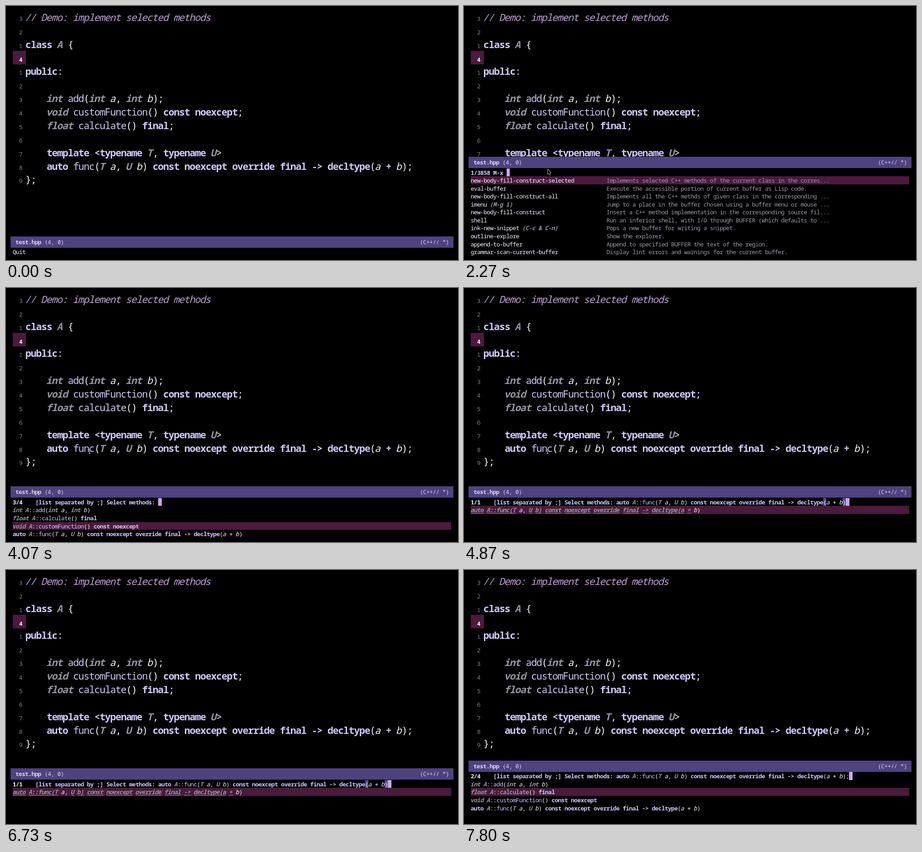
Animation of 998x561 px, one loop 8 s. Source, as an HTML page with a canvas:

```html
<!DOCTYPE html>
<html lang="en">
<head>
<meta charset="utf-8">
<title>Editor demo</title>
<style>
html, body { margin: 0; width: 100%; height: 100%; overflow: hidden; background: #000; }
canvas { display: block; width: 998px; height: 561px; }
</style>
</head>
<body>
<canvas id="stage" width="998" height="561"></canvas>
<script>
const ctx = document.getElementById('stage').getContext('2d');
const LOOP = 8000, TICK = 1000 / 15;
const BIG = { size: 21.6, cell: 11.7 };
const SMALL = { size: 13.1, cell: 7.14 };
const ROW = 29.87, LINE = 17.55, LEFT = 15;

const C = {
  white: '#f6f4fb', lavender: '#cdc8f3', gray: '#9695a0', dim: '#9d9aa8',
  comment: '#c09fd8', number: '#85838a', mode: '#4e427f', modeText: '#d6d0ee',
  hot: '#4b1a3d', cursor: '#c8a8e9', paren: '#574a8c'
};
const STYLE = {
  plain: ['', C.white], bold: ['600', C.white],
  keyword: ['600', C.lavender], func: ['', C.lavender],
  type: ['italic 600', C.gray], param: ['italic', C.white],
  comment: ['italic', C.comment], dim: ['', C.dim], number: ['', C.number],
  mode: ['', C.modeText], modeBold: ['600', C.modeText]
};

const CODE = [
  '// Demo: implement selected methods', '', 'class A {', '', 'public:', '',
  '    int add(int a, int b);',
  '    void customFunction() const noexcept;',
  '    float calculate() final;', '',
  '    template <typename T, typename U>',
  '    auto func(T a, U b) const noexcept override final -> decltype(a + b);',
  '};'
];
const CURRENT = 3;
const METHODS = [
  'int A::add(int a, int b)',
  'float A::calculate() final',
  'void A::customFunction() const noexcept',
  'auto A::func(T a, U b) const noexcept override final -> decltype(a + b)'
];
const PICK = METHODS[3];
const ASK = '[list separated by ;] Select methods: ';
const COMMANDS = [
  ['new-body-fill-construct-selected', '', 'Implements selected C++ methods of the current class in the corres...'],
  ['eval-buffer', '', 'Execute the accessible portion of current buffer as Lisp code.'],
  ['new-body-fill-construct-all', '', 'Implements all the C++ methds of given class in the corresponding ...'],
  ['imenu', '(M-g i)', 'Jump to a place in the buffer chosen using a buffer menu or mouse ...'],
  ['new-body-fill-construct', '', 'Insert a C++ method implementation in the corresponding source fil...'],
  ['shell', '', 'Run an inferior shell, with I/O through BUFFER (which defaults to ...'],
  ['ink-new-snippet', '(C-c & C-n)', 'Pops a new buffer for writing a snippet.'],
  ['outline-explore', '', 'Show the explorer.'],
  ['append-to-buffer', '', 'Append to specified BUFFER the text of the region.'],
  ['grammar-scan-current-buffer', '', 'Display lint errors and warnings for the current buffer.']
];

// Each scene: start time, minibuffer height in lines, kind, selected row
const SCENES = [
  [0, 1, 'quit', 0],
  [670, 11, 'commands', 0],
  [2730, 5, 'methods', 0],
  [3800, 5, 'methods', 1],
  [3970, 5, 'methods', 2],
  [4130, 5, 'methods', 3],
  [4870, 5, 'picked', 0],
  [6790, 6, 'more', 0],
  [7520, 6, 'more', 1]
];

// Filled box snapped to whole pixels
function box(x, y, w, h, color) {
  const left = Math.round(x), top = Math.round(y);
  ctx.fillStyle = color;
  ctx.fillRect(left, top, Math.round(x + w) - left, Math.round(y + h) - top);
}

// Writes one run on the character grid and returns the x after it
function write(str, x, y, style, font = SMALL) {
  const [face, color] = STYLE[style];
  const lean = face.startsWith('italic') ? font.size * 0.05 : 0;
  ctx.font = `${face} ${font.size}px "Noto Sans Mono", "DejaVu Sans Mono", monospace`;
  ctx.fillStyle = color;
  ctx.textAlign = 'center';
  for (const ch of str) {
    if (ch !== ' ') ctx.fillText(ch, x + font.cell / 2 - lean, y);
    x += font.cell;
  }
  return x;
}

function styleOf(token) {
  if (token.startsWith('//')) return 'comment';
  if (/^(class|public|const|noexcept|final|template|typename|auto|override|decltype)$/.test(token)) return 'keyword';
  if (/^(int|void|float|A|T|U)$/.test(token)) return 'type';
  if (/^[ab]$/.test(token)) return 'param';
  if (/^[a-z]/i.test(token)) return 'func';
  return /^(->|[+<])$/.test(token) ? 'keyword' : 'plain';
}

function writeCode(str, x, y, font = SMALL) {
  for (const token of str.match(/\/\/.*|->|\w+|\s+|./g) || []) {
    x = write(token, x, y, styleOf(token), font);
  }
  return x;
}

function drawBuffer(cursorOn) {
  box(LEFT, 99.3, 28.6, 30, C.hot);
  if (cursorOn) box(43.5, 99.3, 11.7, 30, C.cursor);
  CODE.forEach((text, i) => {
    const y = 33 + i * ROW;
    const here = i === CURRENT;
    const label = String(here ? CURRENT + 1 : Math.abs(i - CURRENT));
    write(label, 29, y, here ? 'bold' : 'number');
    writeCode(text, 43.5, y, BIG);
  });
}

function drawModeLine(top) {
  box(0, top, 998, 561 - top, '#000');
  box(10, top, 978, 25, C.mode);
  write(' (4, 0)', write('test.hpp', 21, top + 17, 'modeBold'), top + 17, 'mode');
  write('(C++// *)', 914, top + 17, 'mode');
}

function drawCursor(x, top) {
  box(x, top, 7.6, LINE, C.cursor);
}

function drawHot(top) {
  box(LEFT, top, 968, LINE, C.hot);
}

function drawCommands(lineTop) {
  drawCursor(write('1/3858 M-x ', LEFT, lineTop(0) + 14, 'keyword'), lineTop(0));
  COMMANDS.forEach(([name, keys, note], i) => {
    const top = lineTop(i + 1), y = top + 14;
    if (i === 0) drawHot(top);
    const end = write(name, LEFT, y, 'plain');
    write(keys, end + SMALL.cell, y, 'type');
    write(note, LEFT + 42 * SMALL.cell, y, 'dim');
  });
}

function drawPrompt(count, typed, top) {
  const y = top + 14;
  write(count, LEFT, y, 'bold');
  const x = write(ASK, LEFT + 7 * SMALL.cell, y, 'keyword');
  if (typed === PICK) {
    for (const i of [PICK.lastIndexOf('('), PICK.length - 1]) {
      box(x + i * SMALL.cell, top, SMALL.cell, LINE, C.paren);
    }
  }
  drawCursor(writeCode(typed, x, y), top);
}

function drawMethods(row, lineTop) {
  METHODS.forEach((text, i) => {
    const top = lineTop(i + 1);
    if (i === row) drawHot(top);
    writeCode(text, LEFT, top + 14);
  });
}

// The single remaining candidate, with its matched words underlined
function drawMatch(top) {
  const words = PICK.split(' '), y = top + 14;
  drawHot(top);
  let x = LEFT;
  words.forEach((word, i) => {
    const plain = word === 'a,' || i === words.length - 1;
    const end = plain ? writeCode(word, x, y) : write(word, x, y, 'type');
    if (!plain) box(x, top + 16, end - x, 1, C.gray);
    x = end + SMALL.cell;
  });
}

function drawMini([, lines, kind, row]) {
  const modeTop = 508.5 - (lines - 1) * LINE;
  const lineTop = i => modeTop + 25.6 + i * LINE;
  drawModeLine(modeTop);
  if (kind === 'quit') {
    write('Quit', LEFT, lineTop(0) + 14, 'plain');
  } else if (kind === 'commands') {
    drawCommands(lineTop);
  } else if (kind === 'picked') {
    drawPrompt('1/1', PICK, lineTop(0));
    drawMatch(lineTop(1));
  } else {
    drawPrompt(`${row + 1}/4`, kind === 'more' ? PICK + ';' : '', lineTop(0));
    drawMethods(row, lineTop);
  }
}

function stroke(path, color, width) {
  ctx.lineJoin = 'round';
  ctx.strokeStyle = color;
  ctx.lineWidth = width;
  ctx.stroke(path);
}

function drawBeam(x, y) {
  const p = new Path2D();
  p.moveTo(x - 2, y - 5); p.lineTo(x + 2, y - 5);
  p.moveTo(x, y - 5); p.lineTo(x, y + 5);
  p.moveTo(x - 2, y + 5); p.lineTo(x + 2, y + 5);
  stroke(p, '#000', 2.6);
  stroke(p, '#e8e8e8', 1);
}

function drawArrow(x, y) {
  const p = new Path2D();
  p.moveTo(x, y);
  for (const [dx, dy] of [[0, 11], [2.4, 9], [4, 12.4], [5.4, 11.8], [4.2, 8.4], [7, 8]]) p.lineTo(x + dx, y + dy);
  p.closePath();
  stroke(p, '#e8e8e8', 1.4);
  ctx.fillStyle = '#000';
  ctx.fill(p);
}

function drawMouse(t, kind) {
  if (t < 65 || t >= 5730) return;
  if (kind === 'commands') return drawArrow(185, 360.5);
  const k = Math.min(1, (t - 65) / 465);
  const e = 1 - (1 - k) ** 2;
  drawBeam(762 + (184.5 - 762) * e, 21 + (360.5 - 21) * e);
}

function draw(t) {
  const scene = SCENES.filter(s => s[0] <= t + 5).pop();
  box(0, 0, 998, 561, '#000');
  drawBuffer(t >= 65 && scene[2] === 'quit');
  drawMini(scene);
  drawMouse(t, scene[2]);
}

const start = performance.now();
let last = -1;
function loop() {
  const t = (performance.now() - start) % LOOP;
  const step = Math.floor(t / TICK + 0.02);
  if (step !== last) {
    last = step;
    draw(step * TICK);
  }
  requestAnimationFrame(loop);
}
loop();
</script>
</body>
</html>
```
